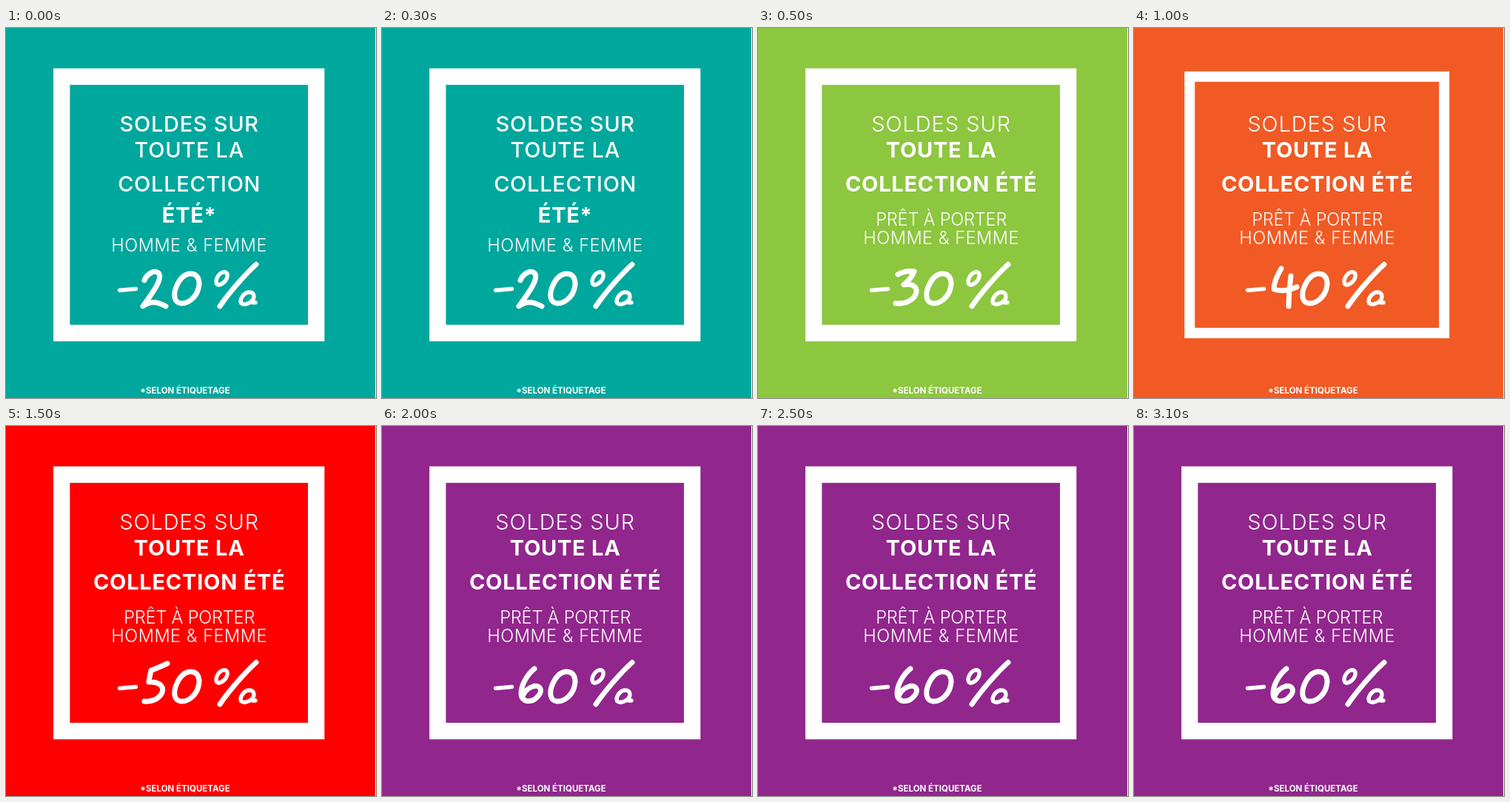
Write an HTML page that moves like this. It is 500x500 px and loops after 3.5 s.

```html
<!DOCTYPE html>
<html lang="fr">
<head>
<meta charset="utf-8">
<title>Soldes</title>
<style>
  html, body { margin: 0; width: 100%; height: 100%; overflow: hidden; background: #fff; }
  svg { display: block; width: 100%; height: 100%; }
  text { font-family: Inter, "Open Sans", sans-serif; fill: #fff; text-anchor: middle; }
  .big { font-size: 29px; }
  .mid { font-size: 23.6px; font-weight: 350; letter-spacing: -.2px; }
  .wide { letter-spacing: .5px; }
  .note { font-size: 11.5px; font-weight: 700; }
  .light { font-weight: 350; letter-spacing: .95px; }
  .medium { font-weight: 500; letter-spacing: .7px; }
  .bold { font-weight: 700; letter-spacing: .75px; }
  .brush { fill: none; stroke: #fff; stroke-width: 7; stroke-linecap: round; stroke-linejoin: round; }
  .brush .thin { stroke-width: 5.4; }
</style>
</head>
<body>
<svg viewBox="0 0 500 500">
  <rect id="back" width="499" height="500"/>
  <rect id="frame" x="75.200" y="65.700" width="344" height="346.500" fill="none" stroke="#fff"/>
  <g id="lines"></g>
  <g class="brush">
    <path class="thin" d="M153.500 354.500L175.500 352.500"/>
    <path id="digit"/>
    <path d="M248 332C259 331 263 341 260 352C257 364 246 373 236 372C227 371 226 360 230 350C234 340 240 333 248 332Z"/>
    <path d="M338 319.500C324 332 302 357 289 376"/>
    <path class="thin" d="M293 330C287 332 282 341 285 346C289 350 298 342 299 336C300 331 297 329 293 330Z"/>
    <path class="thin" d="M328 357C321 358 315 367 318 372C323 376 335 370 335 363C335 358 332 357 328 357M333 371L337 371"/>
  </g>
  <text class="note" x="242" y="494">*SELON ÉTIQUETAGE</text>
</svg>
<script>
  const STEP = 500, LOOP = 3500;
  const $ = id => document.getElementById(id);

  // Each line: text, baseline, classes
  const intro = [
    ["SOLDES SUR", 139.5, "big medium"],
    ["TOUTE LA", 175, "big medium"],
    ["COLLECTION", 221, "big medium"],
    ["ÉTÉ*", 263, "big bold"],
    ["HOMME & FEMME", 301.5, "mid wide"]
  ];
  const offer = [
    ["SOLDES SUR", 139.5, "big light"],
    ["TOUTE LA", 175, "big bold"],
    ["COLLECTION ÉTÉ", 221, "big bold"],
    ["PRÊT À PORTER", 267, "mid"],
    ["HOMME & FEMME", 292, "mid wide"]
  ];

  const digits = {
    2: "M187 341C190 333 200 326 206 331C212 338 201 354 185 376C194 369 203 369 216 376",
    3: "M189 333C197 329 205 328 211 329C208 337 203 342 197 347C208 345 215 349 214 357C212 367 199 374 186 372",
    4: "M199 325C193 335 189 346 189 353C198 356 209 355 220 350M212 335C210 349 209 363 209 376",
    5: "M218 321C211 324 203 328 196 330C195 337 193 342 193 346C206 345 214 351 211 360C207 369 197 373 187 372",
    6: "M206 328C196 336 188 350 188 361C188 375 203 374 210 366C219 357 213 349 204 352C197 354 191 360 190 366"
  };

  const scenes = [
    { color: "#00a79d", digit: 2, lines: intro },
    { color: "#8dc63f", digit: 3, lines: offer },
    { color: "#f15a24", digit: 4, lines: offer, border: 14 },
    { color: "#ff0000", digit: 5, lines: offer },
    { color: "#91268d", digit: 6, lines: offer }
  ];

  function setLines(lines) {
    $("lines").replaceChildren(...lines.map(([label, y, cls]) => {
      const el = document.createElementNS("http://www.w3.org/2000/svg", "text");
      el.setAttribute("x", 247.7);
      el.setAttribute("y", y);
      el.setAttribute("class", cls);
      el.textContent = label;
      return el;
    }));
  }

  let shown;
  function render(time) {
    const index = Math.min(Math.floor(time % LOOP / STEP), scenes.length - 1);
    if (index === shown) return;
    shown = index;
    const { color, digit, lines, border = 22.3 } = scenes[index];
    $("back").setAttribute("fill", color);
    $("frame").setAttribute("stroke-width", border);
    $("digit").setAttribute("d", digits[digit]);
    setLines(lines);
  }

  const start = performance.now();
  function tick() {
    render(performance.now() - start);
    requestAnimationFrame(tick);
  }
  tick();
</script>
</body>
</html>
```
